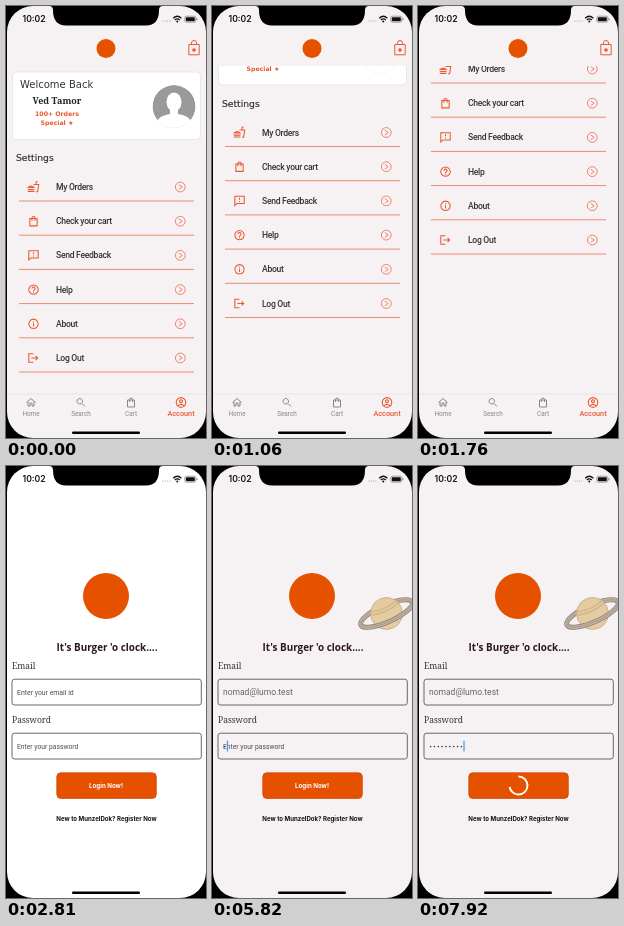
Write an HTML page that moves like this. It is 200 px wide and 432 px high and loops after 7.99 s.

```html
<!DOCTYPE html>
<html lang="en">
<head>
<meta charset="utf-8">
<title>Food app: account and login</title>
<style>
html, body { margin: 0; width: 100%; height: 100%; overflow: hidden; background: #000; }
svg { display: block; width: 100vw; height: 100vh; }
text { white-space: pre; }
.plain { font-family: Roboto, sans-serif; }
.wide { font-family: "DejaVu Sans", sans-serif; }
.serif { font-family: "Noto Serif", serif; font-weight: 500; }
.round { font-family: "Open Sans", sans-serif; font-weight: 700; }
.inter { font-family: Inter, sans-serif; font-weight: 700; }
.row { font-weight: 500; letter-spacing: -.3px; }
.bold { font-weight: 700; }
</style>
</head>
<body>
<svg id="stage" viewBox="0 0 200 432"></svg>
<script>
const LOOP = 7990, INK = '#333', ORANGE = '#e65100', RED = '#ea5730', PALE = '#ee8a72', BG = '#f6f2f4';
const RING = 'M12 3a9 9 0 1 0 .01 0z';
const ICONS = {
  food: 'M1 20.5h13M1 17h13M1.5 13q6-5.5 12 0zM12 7h10l-2 14h-3M17 7V2h3',
  bag: 'M5 7h14v14H5zM9 11V6a3 3 0 0 1 6 0v5',
  note: 'M3 21V3h18v14H7zM12 6v4M12 12v2',
  help: RING + 'M9 10a3 3 0 1 1 4.5 2.6q-1.5 1-1.5 2.4M12 16.2v2',
  info: RING + 'M12 7v2M12 11v6',
  exit: 'M12 4H3v16h9M8 12h12M16 8l4 4-4 4',
  home: 'M3 12l9-8 9 8M6 10v9h4v-6h4v6h4v-9',
  search: 'M9.5 4a5.5 5.5 0 1 0 .01 0zM14 14l6 6',
  user: RING + 'M12 7a2.7 2.7 0 1 0 .01 0zM6 18.5q6-6 12 0'
};

// y is the middle of the capital letters
const text = (x, y, size, str, cls, fill = INK, more = '') =>
  `<text x="${x}" y="${y + size * .36}" font-size="${size}" class="${cls}" fill="${fill}" ${more}>${str}</text>`;
const MID = 'text-anchor="middle"';
const icon = (name, x, y, size, color) =>
  `<path d="${ICONS[name]}" transform="translate(${x - size / 2} ${y - size / 2}) scale(${size / 24})" fill="none" stroke="${color}" stroke-width="2"/>`;
const rect = (x, y, w, h, r, fill, more = '') =>
  `<rect x="${x}" y="${y}" width="${w}" height="${h}" rx="${r}" fill="${fill}" ${more}/>`;
const disc = (x, y, r, fill, more = '') => `<circle cx="${x}" cy="${y}" r="${r}" fill="${fill}" ${more}/>`;

const row = ([name, label], i) => {
  const y = 181 + i * 34.2;
  return icon(name, 27.5, y, 12.5, RED) + text(50, y, 8.6, label, 'plain row') +
    `<path d="M13 ${y + 14}H188" stroke="${PALE}"/>` +
    disc(174.3, y, 4.9, 'none', `stroke="${RED}" stroke-width=".7"`) +
    `<path d="M172.8 ${y - 2.4}l3.4 2.4-3.4 2.4" fill="none" stroke="${RED}" stroke-width=".7"/>`;
};
const tab = ([name, label], i) => {
  const x = 25 + i * 50, on = i === 3, color = on ? RED : '#8a8688';
  return icon(name, x, 396.5, on ? 13 : 12, color) +
    text(x, 407.2, on ? 7.3 : 6.4, label, 'plain', color, MID + (on ? ' font-weight="500"' : ''));
};

const account = `
  <g clip-path="url(#list)"><g id="content">
    ${rect(6.5, 66, 188, 67.5, 4, '#fff', 'stroke="#e6e1e3" stroke-width=".8"')}
    ${text(14, 78, 10, 'Welcome Back', 'wide')}
    ${text(51, 95, 9, 'Ved Tamor', 'serif bold', '#222', MID)}
    ${text(51, 108, 6.2, '100+ Orders', 'wide bold', RED, MID)}
    ${text(51, 117, 6.2, 'Special ★', 'wide bold', RED, MID)}
    <g clip-path="url(#face)">${disc(168, 100.5, 21.5, '#9a9a9a')}
      <ellipse cx="168" cy="96" rx="7.5" ry="9.5" fill="#fff"/>
      <path d="M164 102h8v6q12 2 13 8v8h-34v-8q1-6 13-8z" fill="#fff"/></g>
    ${text(10, 152, 9.2, 'Settings', 'wide', INK, 'stroke="#333" stroke-width=".2"')}
    ${[['food', 'My Orders'], ['bag', 'Check your cart'], ['note', 'Send Feedback'],
       ['help', 'Help'], ['info', 'About'], ['exit', 'Log Out']].map(row).join('')}
  </g></g>
  ${disc(100, 42.5, 9.5, ORANGE)}
  <path d="M182.8 38.5h10.4v10.3h-10.4zM185.5 38.5v-1.5a2.5 2.5 0 0 1 5 0v1.5" fill="none" stroke="${RED}"/>
  ${disc(188, 44, 1.8, RED)}
  <path d="M1 388H200" stroke="#e4dfe1" stroke-width=".7"/>
  ${[['home', 'Home'], ['search', 'Search'], ['bag', 'Cart'], ['user', 'Account']].map(tab).join('')}`;

const band = (half, color, width) =>
  `<path d="M-28 0A28 8.5 0 0 ${half} 28 0" fill="none" stroke="${color}" stroke-width="${width}"/>`;
const ringHalf = half => band(half, '#75675c', 5) + band(half, '#b5a08a', 3.4) + band(half, '#8b7a6b', .6);
const planet = `<g id="planet" opacity=".8" transform="translate(174.5 147.5) rotate(-24)">
  ${ringHalf(1)}${disc(0, 0, 16, '#e0c28d', 'stroke="#b4976c" stroke-width=".7"')}
  <path d="M-15-5Q0 0 15-5M-14-8Q0-3 14-8" fill="none" stroke="#cda873" stroke-width="1.5"/>
  ${ringHalf(0)}</g>`;

const field = y => rect(6, y, 189.3, 25.8, 2.5, 'none', 'stroke="#5a5557" stroke-width=".9"');
const login = `
  ${planet}
  ${disc(100, 130, 23, ORANGE)}
  ${text(101, 181, 9.9, "It's Burger 'o clock....", 'round', '#2b181b', MID)}
  ${text(6, 200, 8.5, 'Email', 'serif')}${field(213.2)}
  ${text(6, 254.2, 8.5, 'Password', 'serif')}${field(267.2)}
  ${text(11, 226.3, 6.9, 'Enter your email id', 'plain', '#56494c', 'id="mailHint"')}
  ${text(11, 280.5, 6.75, 'Enter your password', 'plain', '#56494c', 'id="passHint"')}
  ${text(11, 225.6, 8.5, '', 'plain', '#666', 'id="mail"')}
  <g id="dots"></g>
  ${rect(0, 0, 1.3, 11, .5, '#4f9be8', 'id="caret"')}
  ${rect(50.8, 306.8, 99.5, 25.6, 4, ORANGE, 'stroke="#cf4a0a" stroke-width=".8"')}
  ${text(100, 319.4, 6.2, 'Login Now!', 'inter', '#fff', MID + ' id="label"')}
  <circle id="spinner" cx="100.5" cy="319.5" r="9" fill="none" stroke="#fff" stroke-width="1.9" pathLength="360"/>
  ${text(100.5, 352.6, 6.1, 'New to MunzelDok? Register Now', 'inter', '#111', MID)}`;

const frame = `
  ${text(16.5, 13.3, 8.6, '10:02', 'inter', '#111', 'style="font-weight:600"')}
  ${[157, 159.3, 161.6, 163.9].map(x => disc(x, 15, .6, '#999')).join('')}
  <path d="M167.2 12.2q4.1-3.8 8.2 0M168.8 14q2.5-2.2 5 0" fill="none" stroke="#111" stroke-width="1.3"/>
  ${disc(171.3, 15.5, 1, '#111')}
  ${rect(178.8, 10.2, 11, 6, 1.6, 'none', 'stroke="#666" stroke-width=".6"')}
  ${rect(179.8, 11.2, 9, 4, .8, '#111')}${rect(190.5, 12.2, .9, 2, .4, '#666')}
  <path d="M43 0Q47 0 47 4Q47 19.5 60 19.5H140Q153 19.5 153 4Q153 0 157 0Z"/>
  ${rect(66, 425.4, 68, 2.5, 1.2, '#000')}`;

const stage = document.getElementById('stage');
stage.innerHTML = `<defs>
    <clipPath id="screen">${rect(1, 0, 199, 432, 26, '#000')}</clipPath>
    <clipPath id="list">${rect(0, 60, 200, 328, 0, '#000')}</clipPath>
    <clipPath id="face">${disc(168, 100.5, 21.5, '#000')}</clipPath>
  </defs>${rect(0, 0, 200, 432, 0, '#000')}
  <g clip-path="url(#screen)">${rect(0, 0, 200, 432, 0, BG, 'id="back"')}
    <g id="account">${account}</g><g id="login">${login}</g>${frame}</g>`;

const $ = id => document.getElementById(id);
const show = (id, on) => $(id).setAttribute('visibility', on ? 'inherit' : 'hidden');

const MAIL = 'nomad@lumo.test';
const MAIL_KEYS = [3370, 3440, 3580, 3720, 3860, 4000, 4070, 4210, 4280, 4350, 4490, 4560, 4700, 4770, 4910];
const PASS_KEYS = [5820, 6030, 6170, 6240, 6310, 6380, 6450, 6520, 6520];
const SCROLL = [[430, 0], [640, 4], [780, 7], [850, 3], [990, -35], [1130, -74], [1200, -74], [1340, -130],
  [1410, -148], [1480, -151], [1550, -146], [1760, -118], [1900, -109], [2040, -106]];
const CARET = [[3019, 0], [3020, 1], [5330, 1], [5610, 0], [5819, 0], [5820, 1], [6590, 1], [6800, 0],
  [6940, 0], [7150, 1], [7290, 1], [7500, 0], [7570, 0], [7780, 1]];

function track(keys, t) {
  const i = keys.findIndex(k => k[0] > t);
  if (i < 0) return keys[keys.length - 1][1];
  if (!i) return keys[0][1];
  const [a, from] = keys[i - 1], [b, to] = keys[i];
  return from + (to - from) * (t - a) / (b - a);
}
const typed = (keys, t) => keys.filter(k => k <= t).length;

function draw(now) {
  // The picture advances in 70 ms ticks after the opening hold
  const raw = now % LOOP, t = raw < 500 ? 0 : 500 + 70 * Math.floor((raw - 500) / 70);
  const onLogin = t >= 2810;
  show('account', !onLogin);
  show('login', onLogin);
  $('back').setAttribute('fill', t === 2810 ? '#fff' : BG);
  $('content').setAttribute('transform', `translate(0 ${track(SCROLL, t)})`);
  if (!onLogin) return;

  const letters = typed(MAIL_KEYS, t), dots = typed(PASS_KEYS, t), inPass = t >= 5050;
  show('planet', t >= 2880);
  show('mailHint', !letters);
  show('passHint', t < 5890);
  $('mail').textContent = MAIL.slice(0, letters);
  $('dots').innerHTML = Array.from({ length: dots }, (_, i) => disc(12.6 + 3.85 * i, 280.5, .85, '#444')).join('');

  const mailEnd = letters ? $('mail').getComputedTextLength() + .4 : 0;
  $('caret').setAttribute('x', 11 + (inPass ? 3.82 * dots : mailEnd));
  $('caret').setAttribute('y', inPass ? 274.5 : 220.5);
  $('caret').setAttribute('opacity', track(CARET, t));

  const busy = t >= 7640, p = (t - 7640) / 280;
  show('label', !busy);
  show('spinner', busy);
  if (busy) {
    $('spinner').setAttribute('stroke-dasharray', `${60 + 200 * p} 360`);
    $('spinner').setAttribute('transform', `rotate(${-120 + 30 * p} 100.5 319.5)`);
  }
}

const start = performance.now();
function tick() {
  draw(performance.now() - start);
  requestAnimationFrame(tick);
}
tick();
</script>
</body>
</html>
```
